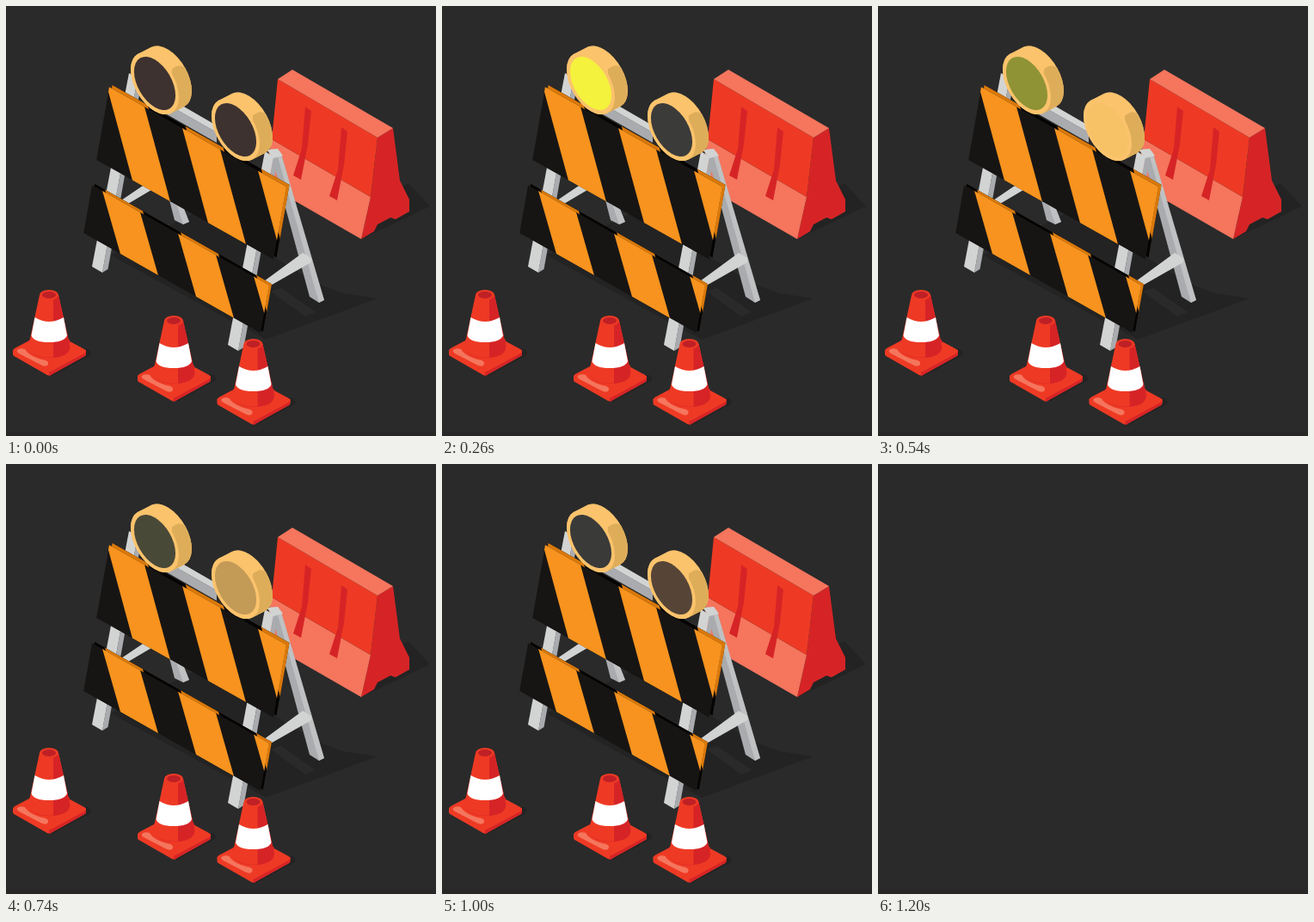
An HTML page that plays this animation: 500x500 px, repeating every 1.22 s.

```html
<!DOCTYPE html>
<html lang="en">
<head>
<meta charset="utf-8">
<title>Road works</title>
<style>
  html, body { margin: 0; width: 100%; height: 100%; overflow: hidden; background: #2a2a2a; }
  svg { display: block; width: 100%; height: 100%; }

  #scene { animation: blink 1220ms step-end infinite; }
  .left { animation: left 1220ms linear infinite; }
  .right { animation: right 1220ms linear infinite; }

  .shadow { fill: #232323; }
  .light { fill: #d2d4d3; }
  .grey { fill: #a9abae; }
  .red { fill: #ee3a24; }
  .deep { fill: #d62426; }
  .pink { fill: #f5755d; }

  @keyframes blink {
    0% { visibility: visible; }
    98.36%, 100% { visibility: hidden; }
  }
  @keyframes left {
    0% { fill: #3d3230; animation-timing-function: cubic-bezier(.37, 0, .63, 1); }
    18%, 20.5% { fill: #f4f23c; animation-timing-function: cubic-bezier(.12, 0, .39, 0); }
    44.26% { fill: #8f9335; animation-timing-function: cubic-bezier(.61, 1, .88, 1); }
    70.5%, 100% { fill: #3a3a39; }
  }
  @keyframes right {
    0% { fill: #3d3230; }
    6%, 24.6% { fill: #3b3b3a; animation-timing-function: cubic-bezier(.37, 0, .63, 1); }
    42.6%, 44.26% { fill: #f6c265; animation-timing-function: cubic-bezier(.12, 0, .39, 0); }
    68.85% { fill: #927447; animation-timing-function: cubic-bezier(.61, 1, .88, 1); }
    95%, 100% { fill: #3d3230; }
  }
</style>
</head>
<body>
<svg viewBox="0 0 500 500">
  <defs>
    <clipPath id="panel"><path d="M0 0H206V100H0z"/></clipPath>

    <g id="wide" clip-path="url(#panel)">
      <path d="M0 0H206V100H0z"/>
      <path fill="currentColor" d="M-3 0h44l45 100h-44zM85 0h44l45 100h-44zM173 0h44l45 100h-44z"/>
    </g>
    <g id="low" clip-path="url(#panel)">
      <path d="M0 0H206V100H0z"/>
      <path fill="currentColor" d="M12 0h44l31 100h-44zM100 0h44l31 100h-44zM188 0h44l31 100h-44z"/>
    </g>

    <g id="leg">
      <path class="grey" d="M153 84L159 81L118.500 306L112 310z"/>
      <path class="light" d="M143 78L153 84L112 310L100 303z"/>
    </g>

    <g id="lamp">
      <path d="M0 0L17.300-16.200" stroke="#fbc36c" stroke-width="64.600" stroke-linecap="round"/>
      <path fill="#dead5a" d="M22.100 23.600L39.400 7.400A32.300 32.300 0 0 0 40.700-38.500Q34-41 23-28z"/>
      <circle r="32.300" fill="#fbc36c"/>
    </g>

    <g id="cone">
      <path class="shadow" d="M52 431L98 406Q101 403 96 399L60 400z"/>
      <path class="red" d="M8 400V405Q8 407 11 408L46 428Q50 431 54 428L90 408Q93 407 93 405V400z"/>
      <path class="deep" d="M50 425V430Q52 430 54 428L90 408Q93 407 93 405V400z"/>
      <path class="red" d="M10 398L46 379Q50 377 54 379L91 399Q95 401.500 91 404L54 424Q50 426.500 46 424L10 404Q6 401 10 398z"/>
      <path class="pink" d="M13 400Q16 397 22 399Q27 408 46 412Q51 414 48 418Q45 420 40 417L15 404Q12 402 13 400z"/>
      <path class="deep" d="M27 388V398C29 413 71 413 74 398V388z"/>
      <path class="red" d="M39 336L26 396C27 413 73 413 74.500 396L61 336z"/>
      <path class="deep" d="M55 341L61 336L74.500 396C74 405 66 408 55 409z"/>
      <path fill="#fff" d="M33.500 362Q50 372 67 362L71 383Q68 391 50 391Q32 391 29.500 383z"/>
      <ellipse class="red" cx="50" cy="336" rx="11" ry="6"/>
      <ellipse cx="50" cy="336" rx="8" ry="4" fill="#bf2026"/>
    </g>
  </defs>

  <path fill="#282627" d="M0 495H500V500H0z"/>

  <g id="scene">
    <path class="shadow" d="M413 271L493 233L468 206L440 220z"/>
    <path class="shadow" d="M122 290L225 238L360 322L392 334L432 340L302 388z"/>
    <path fill="#2a2a2a" d="M308 332L320 328L360 356L348 361z"/>

    <g id="barrier">
      <path class="deep" d="M432 153L450 142L458 203L469 225V239L453 248L447 246L432 254L428 262L413 271L424 222z"/>
      <path class="pink" d="M309 155L424 222L413 271L300 206z"/>
      <path class="red" d="M316 85L432 153L424 222L309 155z"/>
      <path class="pink" d="M316 85L333 74L450 142L432 153z"/>
      <path id="groove" class="deep" d="M348 117L355 122L351 161L343 202L334 197L344 166z"/>
      <use href="#groove" x="42" y="24"/>
    </g>

    <g id="frame">
      <path class="grey" d="M188 218H200L213 251L206 254L196 249z"/>
      <path class="light" d="M206 254L213 251L200 218L196 224z" opacity=".55"/>
      <path class="grey" d="M308 172H320L370 342L364 345L353 338z"/>
      <path class="light" d="M315 172L320 172L370 342L364 345z" opacity=".55"/>
      <path class="grey" d="M180 110L245 147V159L180 122z"/>
      <path class="light" d="M180 108L200 113L245 139V147L180 110z"/>
      <path class="light" d="M128 230L162 207L174 211L130 237z"/>
      <path class="light" d="M300 320L345 287L355 293V298L304 327z"/>
      <use href="#leg"/>
      <use href="#leg" x="158" y="91"/>
      <path class="light" d="M303 167L316 166L322 174L311 177z"/>
    </g>

    <g id="boards">
      <g transform="matrix(1 .565 -.1 .56 100 208)">
        <use href="#low" transform="translate(2.500 -5)" fill="#050403" color="#d9780a"/>
        <use href="#low" fill="#171514" color="#f7931e"/>
      </g>
      <g transform="matrix(1 .563 -.15 .85 120 94)">
        <use href="#wide" transform="translate(3 -4.500)" fill="#050403" color="#d9780a"/>
        <use href="#wide" fill="#171514" color="#f7931e"/>
      </g>
    </g>

    <g transform="matrix(.866 .5 0 1 173 90)">
      <use href="#lamp"/>
      <circle class="left" r="27.800"/>
    </g>
    <g transform="matrix(.866 .5 0 1 267 144)">
      <use href="#lamp"/>
      <circle class="right" r="27.800"/>
    </g>

    <use href="#cone"/>
    <use href="#cone" x="145" y="30"/>
    <use href="#cone" x="237.500" y="57"/>
  </g>
</svg>
</body>
</html>
```
